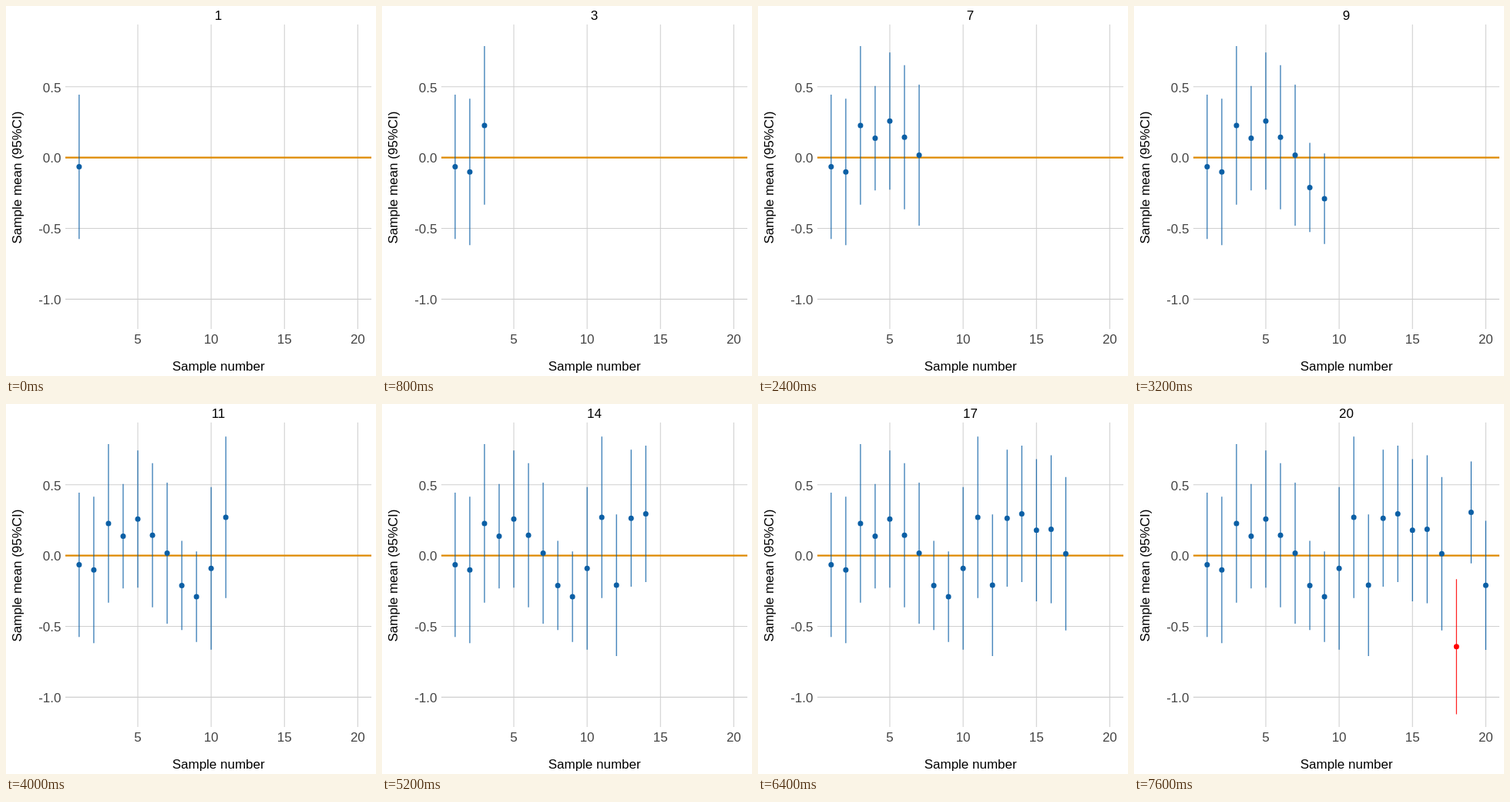
An HTML page that plays this animation: 480 by 480 pixels, repeating every 8000 ms.

```html
<!DOCTYPE html>
<html lang="en">
<head>
<meta charset="utf-8">
<style>
  html, body { margin: 0; width: 100%; height: 100%; overflow: hidden; background: #fff; }
  svg { display: block; width: 100vw; height: 100vh; }
  text { font: 17px "Liberation Sans", Arial, sans-serif; text-anchor: middle; }
  .tick { fill: #444; }
  .y { text-anchor: end; }
  .grid { stroke: #cfcfcf; stroke-width: 1.07; }
  .zero { stroke: #df8a00; stroke-width: 2.13; }
  .ok { stroke: #0b5fa5; fill: #0b5fa5; }
  .miss { stroke: #f00; fill: #f00; }
  .ci { stroke-width: 1.07; }
  circle { stroke: none; }
</style>
</head>
<body>
<svg viewBox="0 0 480 480">
  <g id="axes"></g>
  <g id="data"></g>
  <text id="count" x="275.5" y="18"></text>
  <text x="275.7" y="473">Sample number</text>
  <text transform="translate(20 222.5) rotate(-90)">Sample mean (95%CI)</text>
</svg>
<script>
const NS = "http://www.w3.org/2000/svg";
const STEP = 400;
const [axes, data, count] = ["axes", "data", "count"].map(id => document.getElementById(id));

// plotted data: [mean, margin of error] per sample
const samples = [
  [-0.065, 0.51], [-0.101, 0.517], [0.227, 0.56], [0.137, 0.369], [0.258, 0.484],
  [0.144, 0.509], [0.017, 0.498], [-0.211, 0.315], [-0.29, 0.32], [-0.09, 0.574],
  [0.27, 0.57], [-0.209, 0.5], [0.264, 0.484], [0.295, 0.482], [0.179, 0.502],
  [0.186, 0.523], [0.013, 0.542], [-0.643, 0.477], [0.305, 0.36], [-0.21, 0.456]
];
const xAt = n => 75.87 + 19.025 * n;
const yAt = v => 196.65 - 183.7 * v;

function add(parent, tag, attrs, text = "") {
  const el = document.createElementNS(NS, tag);
  for (const k in attrs) el.setAttribute(k, attrs[k]);
  el.textContent = text;
  parent.appendChild(el);
  return el;
}

const line = (parent, x1, y1, x2, y2, cls) =>
  add(parent, "line", { x1, y1, x2, y2, class: cls });
const across = (y, cls) => line(axes, 77, y, 474, y, cls);

for (let v = 0.5; v >= -1; v -= 0.5) {
  across(yAt(v), "grid");
  add(axes, "text", { x: 71.5, y: yAt(v) + 6.8, class: "tick y" }, v.toFixed(1));
}
for (let n = 5; n <= 20; n += 5) {
  line(axes, xAt(n), 24, xAt(n), 419, "grid");
  add(axes, "text", { x: xAt(n), y: 438, class: "tick" }, n);
}
across(yAt(0), "zero");

const marks = samples.map(([mean, margin], i) => {
  const g = add(data, "g", { class: Math.abs(mean) <= margin ? "ok" : "miss" });
  const x = xAt(i + 1);
  line(g, x, yAt(mean + margin), x, yAt(mean - margin), "ci");
  add(g, "circle", { cx: x, cy: yAt(mean), r: 3.5 });
  return g;
});

function draw(ms) {
  const shown = Math.floor(ms / STEP) % samples.length + 1;
  count.textContent = shown;
  marks.forEach((g, i) => g.setAttribute("display", i < shown ? "inline" : "none"));
}

let start;
function tick(now) {
  start ??= now;
  draw(now - start);
  requestAnimationFrame(tick);
}
draw(0);
requestAnimationFrame(tick);
</script>
</body>
</html>
```
